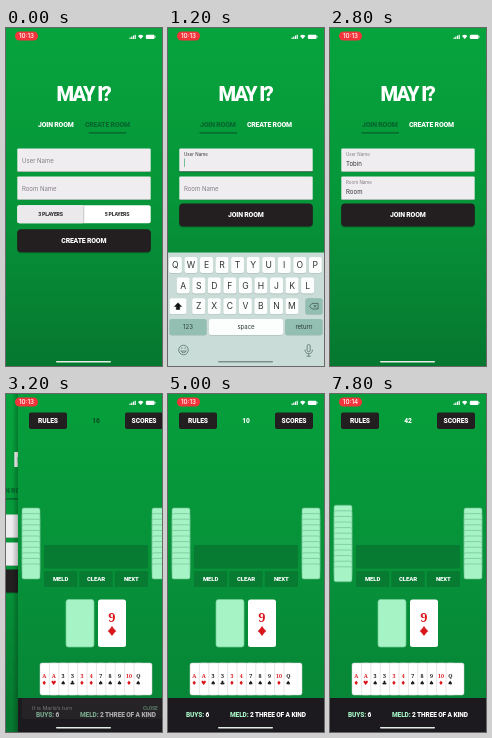
These frames come from a looping animation (156x338 px, 8 s). An HTML page:

```html
<!DOCTYPE html>
<html lang="en">
<head>
<meta charset="utf-8">
<title>May I?</title>
<style>
  html, body { margin: 0; width: 100%; height: 100%; overflow: hidden; background: #05933a; }
  svg { display: block; width: 100%; height: 100%; }
  text { font-family: Inter, Roboto, sans-serif; fill: #fff; white-space: pre; }
  .title, .head, .bold { font-family: Roboto, sans-serif; font-weight: 900; }
  .title { letter-spacing: -1.7px; }
  .head { letter-spacing: -.2px; }
  .bold { font-weight: 800; letter-spacing: -.1px; }
  .mid { text-anchor: middle; }
  .rank { font-family: "Noto Serif", "Liberation Serif", serif; font-weight: 700; text-anchor: middle; }
  .suit { font-family: "DejaVu Sans", sans-serif; text-anchor: middle; }
  .red { fill: #d9161c; }
  .black { fill: #161616; }
  .mint { fill: #a6f3c5; }
</style>
</head>
<body>
<svg viewBox="0 0 156 338" preserveAspectRatio="none">
  <defs>
    <linearGradient id="felt" x2="0" y2="1">
      <stop offset="0" stop-color="#06a43d"/>
      <stop offset=".5" stop-color="#069639"/>
      <stop offset="1" stop-color="#06772f"/>
    </linearGradient>
    <linearGradient id="table" x2="0" y2="1">
      <stop offset="0" stop-color="#069f3c"/>
      <stop offset="1" stop-color="#078436"/>
    </linearGradient>
    <linearGradient id="edge">
      <stop offset="0" stop-color="#000" stop-opacity="0"/>
      <stop offset="1" stop-color="#000" stop-opacity=".25"/>
    </linearGradient>
  </defs>
  <g id="lobby"></g>
  <g id="keyboard"></g>
  <g id="game"></g>
  <g id="status"></g>
</svg>
<script>
const LOOP = 8000, STEP = 200, INK = '#231f20', DIM = '#07662c';
const $ = id => document.getElementById(id);

const rect = (x, y, w, h, fill, r = 0, extra = '') =>
  `<rect x="${x}" y="${y}" width="${w}" height="${h}" rx="${r}" fill="${fill}" ${extra}/>`;
const text = (x, y, size, str, cls = '', extra = '') =>
  `<text x="${x}" y="${y}" font-size="${size}" class="${cls}" ${extra}>${str}</text>`;
const color = c => `style="fill:${c}"`;
const button = (x, y, w, h, label, size, fill = INK, r = 2) =>
  rect(x, y, w, h, fill, r) + text(x + w / 2, y + h / 2 + size * .36, size, label, 'bold mid');

const field = (id, y, label) =>
  rect(11.3, y + .4, 133.4, 23.4, '#f0edf1', 1.2) +
  `<rect id="${id}Line" x="11.3" width="133.4"/>` +
  `<text id="${id}Label" x="16">${label}</text>` +
  text(16, y + 17.6, 6.1, '', '', `id="${id}Value" ${color('#333')}`) +
  rect(16, y + 10.5, .7, 8.3, '#3fa86c', 0, `id="${id}Caret"`);

const lobby = () =>
  rect(0, 0, 156, 338, 'url(#felt)') +
  text(77.3, 73, 20, 'MAY I?', 'title mid') +
  text(49.8, 98.6, 6.9, 'JOIN ROOM', 'head mid', 'id="joinTab"') +
  text(101.4, 98.6, 6.9, 'CREATE ROOM', 'head mid', 'id="createTab"') +
  rect(0, 104.2, 37.5, 1.4, DIM, 0, 'id="tabLine"') +
  field('user', 120, 'User Name') + field('room', 148, 'Room Name') +
  `<g id="players">` +
  rect(11.3, 177.3, 133.4, 18, '#fff', 2) + rect(11.3, 177.3, 66.7, 18, '#ebe9ec', 2) +
  rect(77.5, 177.5, .7, 17.6, '#b5b8b6') +
  text(44.5, 188.3, 5.2, '3 PLAYERS', 'head mid', color('#333')) +
  text(111, 188.3, 5.2, '5 PLAYERS', 'head mid', color('#333')) + `</g>` +
  `<g id="submit">` + rect(11, 1, 134, 23.2, '#04501f', 4, 'opacity=".5"') +
  rect(11.2, .2, 133.6, 23, INK, 4) +
  text(77.8, 14.2, 6.9, '', 'head mid', 'id="submitText"') + `</g>`;

function keyboard() {
  const special = '#92bfb1', pitch = 15.55;
  const key = (x, y, w, fill = '#fcfefd') =>
    rect(x, y + .6, w, 16, '#a3b6b1', 2) + rect(x, y, w, 16, fill, 2);
  const row = (letters, x0, y) => [...letters].map((c, i) => {
    const x = x0 + i * pitch;
    return key(x, y, 13) + text(x + 6.5, y + 11.1, 8.6, c, 'mid letter', color('#333'));
  }).join('');
  const label = (x, str) => text(x, 301.3, 6, str, 'mid', color('#2c3a36'));
  return rect(0, 224.5, 156, 113.5, '#c9dcd7') +
    row('QWERTYUIOP', .9, 229) + row('ASDFGHJKL', 8.7, 249.6) + row('ZXCVBNM', 24.2, 270.2) +
    key(1.5, 270.2, 17) + rect(1.5, 270.2, 17, 16, special, 2, 'id="shiftOff"') +
    `<path id="shiftIcon" d="M10 274.8l3.6 3.7h-1.9v3h-3.4v-3h-1.9z" stroke="#222" stroke-width=".6"/>` +
    key(137.5, 270.2, 17, special) +
    `<path d="M141.5 278.2l2.6-2.8h6v5.6h-6zM145.7 276.9l2.6 2.6m0-2.6l-2.6 2.6" fill="none" stroke="#2c3a36" stroke-width=".6"/>` +
    key(1.5, 291, 37, special) + key(41, 291, 74) + key(117.2, 291, 37.3, special) +
    label(20, '123') + label(78, 'space') + label(136, 'return') +
    `<g fill="none" stroke="#5b736d" stroke-width=".8"><circle cx="15.5" cy="322" r="4.8"/>` +
    `<path d="M12.7 323q2.8 3.4 5.6 0zM13.8 319.4v1.5M17.2 319.4v1.5"/>` +
    `<path d="M137 321.5q0 4.2 3.7 4.2t3.7-4.2M140.7 326v2.2M138.5 328.2h4.4"/>` +
    `<rect x="139.2" y="316.5" width="3" height="7.3" rx="1.5"/></g>`;
}

const stack = (x, count) => {
  const gap = 5.6, h = 15, top = 149.5 - ((count - 1) * gap + h) / 2;
  return Array.from({ length: count }, (_, i) =>
    rect(x, top + i * gap, 18, h, '#a6f3c5', 1.8, 'stroke="#65bd88" stroke-width=".6"')).join('');
};

const hand = () => 'A♦ A♥ 3♠ 3♣ 3♦ 4♦ 7♠ 8♠ 9♠ 10♦ Q♠'.split(' ').map((card, i) => {
  const x = 22 + i * 9.4, suit = card.slice(-1);
  const cls = '♦♥'.includes(suit) ? 'red' : 'black';
  return rect(x, 269, 18, 32, '#fff', 2, 'stroke="#c9cfcb" stroke-width=".5"') +
    text(x + 4.3, 284, 5.4, card.slice(0, -1), 'rank ' + cls) +
    text(x + 4.3, 291.3, 6, suit, 'suit ' + cls);
}).join('');

const game = () =>
  rect(-6, 0, 6, 338, 'url(#edge)') + rect(0, 0, 156, 338, 'url(#table)') +
  button(11, 18.5, 38, 16.5, 'RULES', 6.7) + button(107, 18.5, 38, 16.5, 'SCORES', 6.7) +
  text(78, 29.3, 6.6, '', 'bold mid', 'id="counter"') +
  `<g id="leftStack"></g>` + stack(134, 11) +
  rect(26, 151, 104, 23.5, '#067b31', 1) +
  ['MELD', 'CLEAR', 'NEXT'].map((s, i) => button(26 + i * 35.4, 177, 33.2, 16, s, 6, '#067b31', 1)).join('') +
  rect(48, 205.5, 28, 47.5, '#a6f3c5', 2.5, 'stroke="#72cf97" stroke-width=".7"') +
  rect(80, 205.5, 28, 47.5, '#fff', 2.5) +
  text(94, 227.5, 13, '9', 'rank red') +
  `<path class="red" d="M94 232q1.6 2.8 4.2 5q-2.6 2.2-4.2 5q-1.6-2.8-4.2-5q2.6-2.2 4.2-5z"/>` +
  hand() + rect(0, 304, 156, 34, '#1d1a1f') +
  text(18, 323, 6.5, '<tspan class="mint">BUYS:</tspan> 6', 'bold') +
  text(62, 323, 6.5, '<tspan class="mint">MELD:</tspan> 2 THREE OF A KIND', 'bold') +
  `<g id="toast">` + rect(4, 304, 148, 21, '#323232', 1.5) +
  text(14, 315.5, 5.4, 'It is Marla’s turn') + text(125, 315.5, 5, 'CLOSE', 'bold mint') + `</g>`;

const status = () =>
  rect(9, 3.4, 23, 9.2, '#f5333b', 4.6) + text(20.5, 10.2, 6.3, '', 'mid', 'id="clock" font-weight="500"') +
  [0, 1, 2, 3].map(i => rect(123.5 + i * 1.7, 9.4 - i * .9, 1.2, 1.6 + i * .9, '#fff', .3)).join('') +
  `<path d="M132 8q2.7-2.6 5.4 0l-2.7 3z" fill="#fff"/>` +
  rect(139.8, 6.7, 8.8, 4.2, '#fff', 1.2) + rect(149, 8, .6, 1.6, '#fff', .3) +
  rect(50, 333, 55, 1.4, '#fff', .7, 'id="homeBar"');

Object.entries({ lobby, keyboard, game, status }).forEach(([id, build]) => $(id).innerHTML = build());

// Latest value whose time has been reached; pairs are [time, value].
const at = (t, pairs) => pairs.filter(p => p[0] <= t).pop()[1];
const show = (id, on) => $(id).style.display = on ? '' : 'none';
const set = (id, attrs) => Object.entries(attrs).forEach(([k, v]) => $(id).setAttribute(k, v));
const move = (id, x, y) => set(id, { transform: `translate(${x} ${y})` });

function setField(id, y, value, focused) {
  const floated = focused || value;
  const label = $(id + 'Label'), output = $(id + 'Value');
  set(id + 'Label', { y: y + (floated ? 8.2 : 14.5), 'font-size': floated ? 4.5 : 6 });
  label.style.fill = focused ? '#333' : '#827e84';
  output.textContent = value;
  set(id + 'Line', { y: y + 23.4, height: focused ? .8 : .4, fill: focused ? '#174a2b' : '#8d9a91' });
  set(id + 'Caret', { x: 16.2 + (value ? output.getComputedTextLength() : 0) });
  show(id + 'Caret', focused);
}

function render(t) {
  const joining = t >= 600;
  const slide = at(t, [[0, 156], [3200, 12], [3400, 0]]);
  const drop = at(t, [[0, 113], [1000, 38], [1200, 0], [2800, 113]]);
  const focus = at(t, [[0, ''], [1000, 'user'], [2000, 'room'], [2800, '']]);
  const user = 'Tobin'.slice(0, at(t, [[0, 0], [1400, 1], [1600, 4], [1800, 5]]));
  const room = 'Room'.slice(0, at(t, [[0, 0], [2000, 1], [2200, 3], [2400, 4]]));

  move('lobby', -.3 * (156 - slide), 0);
  $('joinTab').style.fill = joining ? DIM : '#fff';
  $('createTab').style.fill = joining ? '#fff' : DIM;
  set('tabLine', { x: joining ? 31.5 : 82.8 });
  setField('user', 120, user, focus === 'user');
  setField('room', 148, room, focus === 'room');
  show('players', !joining);
  move('submit', 0, joining ? 175.3 : 201);
  $('submitText').textContent = joining ? 'JOIN ROOM' : 'CREATE ROOM';

  const caps = !(focus === 'room' ? room : user);
  move('keyboard', 0, drop);
  show('keyboard', drop < 113);
  show('shiftOff', !caps);
  set('shiftIcon', { fill: caps ? '#111' : 'none' });
  document.querySelectorAll('.letter').forEach(k =>
    k.textContent = caps ? k.textContent.toUpperCase() : k.textContent.toLowerCase());

  move('game', slide, 0);
  show('game', slide < 156);
  $('counter').textContent = t < 6900 ? 10 + Math.floor((5100 - t) / 300) : 45 - Math.floor((t - 6900) / 300);
  $('counter').style.fill = t < 3400 ? '#07501f' : '#fff';
  $('leftStack').innerHTML = stack(4, t < 7400 ? 11 : 12);
  $('toast').style.opacity = at(t, [[0, 0], [3200, .4], [3400, 1], [4400, .4], [4600, 0]]);

  $('clock').textContent = t < 7400 ? '10:13' : '10:14';
  set('homeBar', { fill: drop < 113 ? '#7d918b' : '#e3efe6' });
}

let last = -1;
const start = performance.now();
function tick() {
  const t = Math.floor((performance.now() - start) % LOOP / STEP) * STEP;
  if (t !== last) render(last = t);
  requestAnimationFrame(tick);
}
tick();
</script>
</body>
</html>
```
